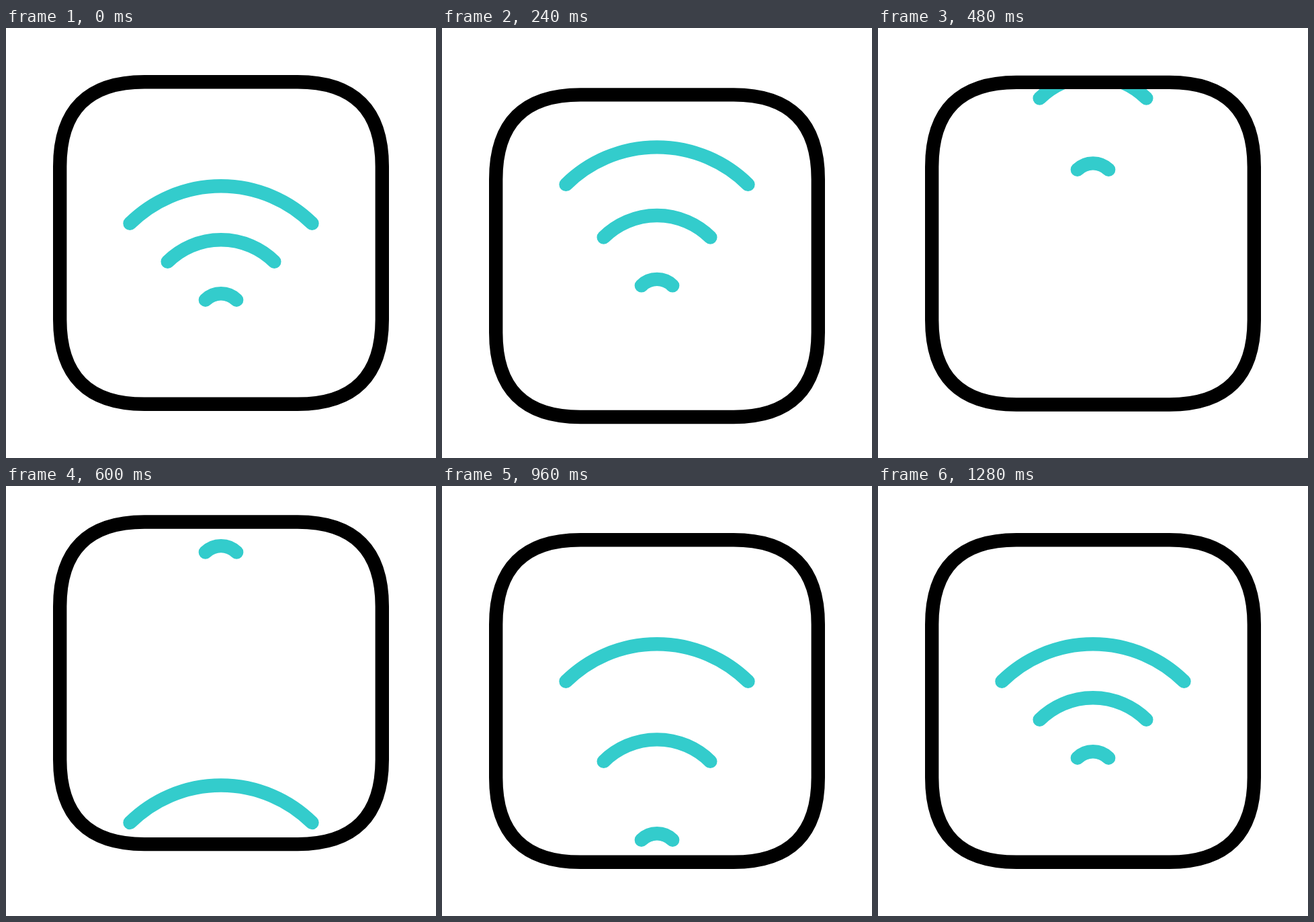
These frames come from a looping animation (640 by 640 pixels, 1.48 s). An HTML page with a canvas:

```html
<!DOCTYPE html>
<html lang="en">
<head>
<meta charset="utf-8">
<title>Wireless signal</title>
<style>
  html, body { margin: 0; width: 100%; height: 100%; overflow: hidden; background: #fff; }
  canvas { display: block; width: 640px; height: 640px; }
</style>
</head>
<body>
<canvas id="stage" width="640" height="640"></canvas>
<script>
const ctx = document.getElementById('stage').getContext('2d');
const LOOP = 1480, STEP = 40;
const TEAL = '#33cccc', LINE = 20.4;
const SPREAD = 44.6 * Math.PI / 180;

// The frame bounces; the arcs ride along with it.
const bounce = [[40, 0], [360, 28], [600, -26.7], [960, 0]];

// Each arc leaves through the top, then returns from below.
const arcs = [
  { radius: 193, leave: 80, turn: 560, settle: 960, up: 297, down: 243.8 },
  { radius: 113, leave: 80, turn: 730, settle: 1122, up: 364, down: 167.5 },
  { radius: 33, leave: 80, turn: 880, settle: 1280, up: 389, down: 136.2 }
];

function ease(t, start, end) {
  const u = Math.min(1, Math.max(0, (t - start) / (end - start)));
  return u * u * (3 - 2 * u);
}

function follow(keys, t) {
  let value = keys[0][1];
  for (let i = 1; i < keys.length; i++) {
    value += (keys[i][1] - keys[i - 1][1]) * ease(t, keys[i - 1][0], keys[i][0]);
  }
  return value;
}

function arcShift(arc, t) {
  return t < arc.turn
    ? -arc.up * ease(t, arc.leave, arc.turn)
    : arc.down * (1 - ease(t, arc.turn, arc.settle));
}

function makeBox() {
  const half = 239.8, flat = 114;
  const box = new Path2D();
  for (let i = 0; i < 4; i++) {
    const c = [1, 0, -1, 0][i], s = [0, 1, 0, -1][i];
    const at = (x, y) => [320 + x * c - y * s, 320 + x * s + y * c];
    if (i === 0) box.moveTo(...at(-flat, -half));
    box.lineTo(...at(flat, -half));
    box.quadraticCurveTo(...at(half, -half), ...at(half, -flat));
  }
  box.closePath();
  return box;
}
const box = makeBox();

function draw(t) {
  ctx.fillStyle = '#fff';
  ctx.fillRect(0, 0, 640, 640);
  ctx.lineWidth = LINE;
  ctx.lineCap = 'round';

  ctx.save();
  ctx.translate(0, follow(bounce, t));
  ctx.save();
  ctx.clip(box);
  ctx.strokeStyle = TEAL;
  for (const arc of arcs) {
    const up = -Math.PI / 2;
    ctx.beginPath();
    ctx.arc(320, 428.2 + arcShift(arc, t), arc.radius, up - SPREAD, up + SPREAD);
    ctx.stroke();
  }
  ctx.restore();
  ctx.strokeStyle = '#000';
  ctx.stroke(box);
  ctx.restore();
}

const origin = performance.now();
function tick() {
  const t = (performance.now() - origin) % LOOP;
  draw(Math.floor(t / STEP) * STEP);
  requestAnimationFrame(tick);
}
draw(0);
requestAnimationFrame(tick);
</script>
</body>
</html>
```
